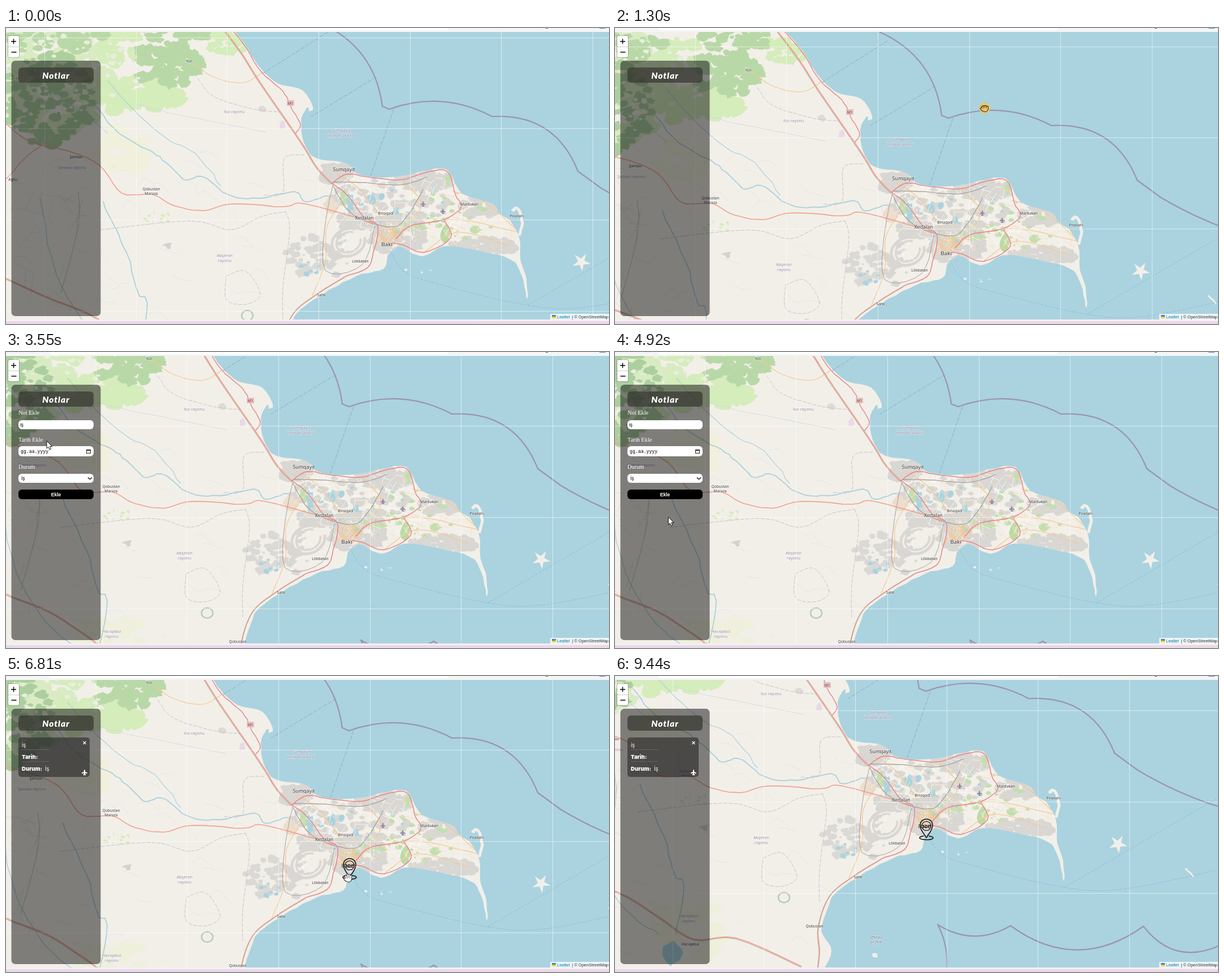
Recreate the animation shown at these times as an HTML page with a canvas. Size 1067 by 525 pixels, loop 9.51 s.

```html
<!DOCTYPE html>
<html lang="tr">
<head>
<meta charset="utf-8">
<title>Notlar</title>
<style>
html, body { margin: 0; width: 100%; height: 100%; overflow: hidden; background: #f6f6f6; }
canvas { display: block; width: 1067px; height: 525px; }
</style>
</head>
<body>
<canvas id="stage" width="1067" height="525"></canvas>
<script>
const LOOP = 9510, W = 1067, H = 525, TOP = 12, MAP_W = 1200, MAP_H = 660;
const ctx = document.getElementById('stage').getContext('2d');
const SANS = '"Noto Sans", sans-serif', ARIAL = '"Liberation Sans", Arial, sans-serif';

let seed = 7;
const rnd = () => (seed = (seed * 16807) % 2147483647) / 2147483647;
const spread = r => (rnd() - .5) * 2 * r;

// Smooth path through "x,y x,y ..." with a seeded wiggle between the key points.
function curve(str, wiggle = 0, closed = false) {
  const pts = str.trim().split(/\s+/).map(s => s.split(',').map(Number));
  const path = new Path2D(), last = pts.length - 1, steps = 5;
  path.moveTo(...pts[0]);
  for (let i = 0; i < last; i++) {
    const a = pts[Math.max(0, i - 1)], b = pts[i], c = pts[i + 1], d = pts[Math.min(last, i + 2)];
    for (let s = 1; s <= steps; s++) {
      const u = s / steps, w = s < steps ? wiggle : 0;
      const mix = k => b[k] + .5 * u * (c[k] - a[k] + u * (2 * a[k] - 5 * b[k] + 4 * c[k] - d[k]
        + u * (3 * (b[k] - c[k]) + d[k] - a[k])));
      path.lineTo(mix(0) + spread(w), mix(1) + spread(w));
    }
  }
  if (closed) path.closePath();
  return path;
}

function text(c, str, x, y, font, color, align = 'left') {
  c.font = font; c.fillStyle = color; c.textAlign = align;
  c.fillText(str, x, y);
}

function box(c, x, y, w, h, r, color) {
  c.fillStyle = color;
  c.beginPath(); c.roundRect(x, y, w, h, r); c.fill();
}

function seg(c, x1, y1, x2, y2) {
  c.beginPath(); c.moveTo(x1, y1); c.lineTo(x2, y2); c.stroke();
}

function plane(c, x, y, r, color) {
  c.save(); c.translate(x, y);
  c.strokeStyle = color; c.lineWidth = r * .42; c.lineCap = 'round';
  seg(c, 0, -r * .8, 0, r * .8);
  for (const side of [-1, 1]) {
    seg(c, 0, -r * .1, side * r * .8, r * .25);
    seg(c, 0, r * .7, side * r * .3, r * .85);
  }
  c.restore();
}

function buildMap() {
  const cv = document.createElement('canvas');
  cv.width = MAP_W; cv.height = MAP_H;
  const m = cv.getContext('2d');
  m.translate(0, TOP);
  m.lineJoin = m.lineCap = 'round';
  const line = (str, color, w = 1, wiggle = .6, dash = []) => {
    m.strokeStyle = color; m.lineWidth = w; m.setLineDash(dash);
    m.stroke(curve(str, wiggle)); m.setLineDash([]);
  };
  const blob = (x, y, rx, ry, color) => {
    m.fillStyle = color; m.beginPath();
    for (let a = 0; a < 6.2; a += .6) {
      const r = .65 + rnd() * .5;
      m.lineTo(x + rx * r * Math.cos(a), y + ry * r * Math.sin(a));
    }
    m.fill();
  };
  const scatter = (n, cx, cy, rx, ry, size, color) => {
    for (let i = 0; i < n; i++) {
      const a = rnd() * 6.3, r = Math.sqrt(rnd()), s = size * (.3 + rnd());
      blob(cx + rx * r * Math.cos(a), cy + ry * r * Math.sin(a), s * 1.4, s, color);
    }
  };
  const strokes = (n, cx, cy, rx, ry, len, color, w) => {
    m.strokeStyle = color; m.lineWidth = w;
    for (let i = 0; i < n; i++) {
      const x = cx + spread(rx), y = cy + spread(ry), a = .5 + (i % 2) * 1.57 + spread(.5), d = len * (.4 + rnd());
      seg(m, x, y, x + d * Math.cos(a), y + d * Math.sin(a));
    }
  };

  m.fillStyle = '#aad3df'; m.fillRect(0, -TOP, MAP_W, MAP_H);
  const land = curve(`388,-12 418,22 445,65 480,98 524,110 543,140 537,148 533,141 522,165 530,210 552,232 600,240
    628,261 690,264 740,254 780,251 806,293 858,311 874,330 893,343 908,372 910,408 921,445 922,480 913,440 893,411
    830,393 775,387 735,405 698,388 676,402 668,427 620,440 562,471 520,500 507,522 493,569 511,605 490,650`, .9);
  land.lineTo(-50, 650); land.lineTo(-50, -12); land.closePath();
  m.save(); m.clip(land);
  m.fillStyle = '#f2efe9'; m.fillRect(-50, -TOP, MAP_W, MAP_H);

  // woods and meadows
  const meadow = '#d5ecbb', wood = '#b9d8a7';
  scatter(110, 75, 80, 105, 105, 16, '#d9ebc3');
  scatter(60, 235, 118, 75, 30, 13, meadow);
  scatter(30, 205, 30, 45, 40, 11, meadow);
  scatter(30, 385, 25, 45, 20, 8, meadow);
  scatter(70, 285, 62, 62, 38, 10, wood);
  scatter(35, 290, 5, 75, 22, 9, wood);
  scatter(160, 75, 125, 80, 85, 8, '#adcf9f');
  scatter(45, 85, 20, 95, 26, 9, wood);
  scatter(70, 110, 85, 130, 85, 4, '#e8eedb');
  scatter(24, 205, 215, 40, 50, 14, '#f1f0dc');
  scatter(30, 265, 565, 95, 50, 14, '#eff0dc');
  scatter(14, 265, 335, 30, 10, 3, meadow);

  // towns and bare ground
  const town = '#d9d7d3';
  scatter(40, 583, 257, 26, 17, 8, town);
  scatter(75, 738, 272, 50, 17, 8, town);
  scatter(80, 690, 366, 50, 32, 8, town);
  scatter(45, 620, 340, 30, 16, 7, town);
  scatter(110, 680, 310, 105, 42, 6, town);
  scatter(40, 835, 318, 32, 18, 6, town);
  scatter(55, 842, 387, 58, 13, 7, town);
  scatter(30, 580, 400, 26, 45, 5, town);
  scatter(38, 530, 402, 34, 35, 7, '#dad9d6');
  scatter(10, 285, 385, 7, 5, 3, '#d2d3d1');
  scatter(10, 575, 317, 9, 8, 6, '#ecddcc');
  m.strokeStyle = '#d8d7d3';
  for (const r of [30, 22]) {
    m.lineWidth = r / 6;
    m.beginPath(); m.ellipse(606, 380, r, r * .8, -.4, .2, 5.4); m.stroke();
  }
  blob(489, 171, 6, 8, '#ead9e5');
  blob(454, 144, 8, 6, '#dddbd8');

  const green = '#c2dfae';
  blob(777, 366, 9, 18, '#b9dba5');
  blob(782, 270, 5, 14, green);
  blob(830, 358, 11, 9, green);
  blob(598, 300, 7, 17, green);
  scatter(40, 770, 335, 100, 45, 4, green);

  // lakes and rivers
  const water = '#aad3df', river = '#a9d0dc';
  blob(609, 310, 7, 20, water);
  blob(647, 304, 8, 12, water);
  blob(665, 299, 5, 8, water);
  blob(690, 325, 6, 8, water);
  blob(230, 608, 18, 26, water);
  scatter(16, 700, 320, 85, 45, 3, water);
  scatter(10, 537, 427, 18, 14, 3, water);
  line('160,140 200,187 250,215 285,240 318,270 345,263 395,296 450,302 510,290 530,308 569,298', river, 1.8, 1.6);
  line('180,94 235,155 290,200 335,222 380,280', river, 1.2, 1.4);
  line('172,308 214,400 234,470 250,488 236,575', river, 1.8, 2);
  line('60,300 90,440 145,530 205,575', river, 1.4, 1.8);
  line('0,70 90,120 180,187', river, 1, 1.5);
  line('230,135 310,155 460,185', '#c2dbe0', .8, 1.5);
  for (let i = 0; i < 45; i++) {
    const x = rnd() * 520, y = 200 + rnd() * 400;
    line(`${x},${y} ${x + 15},${y + spread(14)} ${x + 34},${y + 10}`, '#d9e0de', .6, 1.5);
  }

  // district borders
  const edge = '#c3bac4', dashes = [6, 3];
  line('340,90 365,120 430,142 485,150', edge, .9, 1, dashes);
  line('527,225 492,232 490,292 455,296', edge, .9, 0, dashes);
  line('168,358 326,342 398,358 452,334 495,326', edge, .9, 0, dashes);
  line('495,326 502,360 490,460 490,517', edge, .9, 0, dashes);
  line('390,440 424,431 450,472 425,490 390,482 390,440', edge, .9, 0, dashes);
  m.strokeStyle = '#b5ccb2'; m.lineWidth = 2.4;
  m.beginPath(); m.ellipse(427, 510, 10, 9, 0, 0, 7); m.stroke();

  // streets
  const amber = '#f6c78d';
  strokes(130, 705, 318, 110, 58, 20, '#fdfbf7', .8);
  strokes(50, 705, 318, 105, 55, 20, '#f5d9b4', .9);
  strokes(40, 676, 366, 18, 15, 12, amber, 1.1);
  strokes(30, 840, 355, 60, 30, 16, '#f7e0c2', .8);
  strokes(30, 75, 370, 70, 110, 34, '#d3d0cb', .6);
  line('330,62 370,88 420,97 452,80', amber, 1.2);
  line('600,300 568,352 565,415 542,475', amber, 1.2);
  line('585,258 630,290 672,350', amber, 1.3);
  line('700,270 735,312 700,360 678,374', amber, 1.3);
  line('790,290 840,304 895,350 910,368', amber, 1.2);
  line('720,350 800,340 905,362', amber, 1.2);
  line('742,396 800,362 890,386', amber, 1.2);

  // railways and main roads
  const rail = '#a5a09c', road = '#f2a08c', red = '#e98386';
  line('580,273 625,274 700,278 745,264', rail, 1.3);
  line('578,278 608,326 662,350 700,346 738,286', rail, 1.3);
  line('578,280 566,340 565,430 630,420 652,352', rail, 1);
  line('128,290 128,350 97,470', '#c0bcb8', 1);
  line('0,170 40,200 110,218 165,243 205,293 258,295 300,316 350,324 400,312 490,317 530,312 655,347', road, 1.6);
  line('75,202 40,225 0,268', road, 1.3);
  const pair = (str, w) => {
    line(str, road, w, 0);
    m.save(); m.translate(-1, 1.5); line(str, rail, .9, 0); m.restore();
  };
  pair('0,444 77,479 147,507 208,546 268,584 343,582 458,632', 1.8);
  pair('376,-10 415,42 450,97 522,202 550,247 577,276', 2);
  line('388,-10 420,28 452,78 490,112 505,142 521,172 513,186', red, 1.4);
  line('577,275 604,259 645,265 700,269 740,257 780,254 795,295 805,318 775,340 718,350 690,374', red, 1.5);
  line('775,340 787,372 740,398 700,384 680,382', red, 1.5);
  line('577,275 604,297 632,334 658,352 650,397 640,425 600,441', red, 1.5);
  pair('600,441 550,472 508,507 488,562 490,607 485,650', 1.8);
  m.restore();

  // islands
  const isle = '#f2efe9';
  line('897,323 906,321 914,345 909,366', isle, 5, 1);
  m.fillStyle = isle; m.beginPath();
  for (let i = 0; i < 10; i++) {
    const r = i % 2 ? 6 : 17, a = i * .628 - 2.3;
    m.lineTo(1018 + r * Math.cos(a), 415 + r * Math.sin(a));
  }
  m.fill();
  line('1138,459 1151,472', isle, 3);
  blob(588, 612, 5, 5, isle);
  scatter(5, 735, 431, 32, 4, 2, isle);

  // sea borders: chords bent outward by a share of their length
  const arc = (x1, y1, x2, y2, bend) => {
    const dx = x2 - x1, dy = y2 - y1;
    m.strokeStyle = '#9a94b2'; m.lineWidth = 2.2;
    m.beginPath(); m.moveTo(x1, y1);
    m.quadraticCurveTo(x1 + dx / 2 + dy * bend * 2, y1 + dy / 2 - dx * bend * 2, x2, y2);
    m.stroke();
  };
  arc(556, -9, 666, 139, .14);
  arc(666, 139, 678, 144, 0);
  arc(678, 144, 860, 157, .11);
  arc(860, 157, 1012, 254, .18);
  arc(1012, 254, 1053, 284, 0);
  arc(1053, 284, 1200, 350, -.03);
  arc(714, 645, 699, 558, -.08);
  arc(699, 558, 828, 560, -.15);
  arc(828, 560, 1063, 561, -.18);
  arc(1063, 561, 1200, 594, -.2);

  const thin = '#8f9cb8', ferry = '#8eb4d6';
  line('570,7 452,82', thin, .8, 0, [7, 3]);
  line('655,87 540,157', thin, .8, 0, [7, 3]);
  line('686,144 645,262', thin, .8, 0, [7, 3]);
  line('680,395 706,433 768,455 923,492 1028,495 1200,460', ferry, .8, 0, [4, 3]);
  line('923,492 1200,330', ferry, .8, 0, [4, 3]);

  // tile seams
  m.fillStyle = 'rgba(255,255,255,.55)';
  for (let x = 68.3; x < MAP_W; x += 161.7) m.fillRect(Math.floor(x), -TOP, 1, MAP_H);
  for (let y = 17; y < MAP_H; y += 161.7) m.fillRect(0, Math.floor(y), MAP_W, 1);

  const label = (str, x, y, size = 6.7, color = '#3a3a3a', style = '') => {
    m.strokeStyle = 'rgba(255,255,255,.5)'; m.lineWidth = 1.4;
    m.font = `${style} ${size}px ${SANS}`; m.textAlign = 'center';
    m.strokeText(str, x, y); m.fillStyle = color; m.fillText(str, x, y);
  };
  const area = (lines, x, y, size = 7.2, color = '#9b87a6', style = '') =>
    lines.split('/').forEach((s, i) => label(s, x, y + i * (size + 1.8), size, color, style));
  label('Sumqayıt', 598, 254, 8.8);
  label('Xırdalan', 634, 340, 8.6);
  label('Bakı', 674, 387, 9.8);
  label('Binəqədi', 672, 331);
  label('Mərdəkan', 820, 315);
  label('Pirallahı', 904, 336);
  label('Lökbatan', 627, 416);
  label('Sahil', 558, 476);
  label('Qobustan', 257, 288);
  label('Mərəzə', 257, 296);
  label('Xızı', 324, 61);
  label('Şamaxı', 124, 231);
  label('Ağsu', 12, 271);
  label('Qobustan', 481, 563);
  label('Hacıqabul', 261, 595);
  area('Xızı rayonu', 404, 151);
  area('Şamaxı rayonu', 117, 250);
  area('Abşeron/rayonu', 387, 406);
  area('Hacıqabul/rayonu', 258, 545);
  area('Sumqayıt/İnzibati ərazisi', 593, 184);
  area('offshore/oil field', 590, 583, 6.2, '#6e7892', 'italic');
  box(m, 497, 128, 13, 10, 1, '#e6bfc0');
  text(m, 'M1', 503.5, 135.6, `6.5px ${SANS}`, '#744247', 'center');
  plane(m, 738, 312, 4.5, '#8c82ad');
  plane(m, 773, 325, 4.5, '#8c82ad');
  return cv;
}

const ease = k => k * k * (3 - 2 * k);
const ramp = (t, a, b) => ease(Math.min(1, Math.max(0, (t - a) / (b - a))));
const between = (t, a, b) => t >= a && t < b;

// Pointer stops: time, x, y, held until the next stop. Held moves drag the map.
const HELD = true;
const STOPS = [
  [320, 805, 522], [720, 742, 126, HELD], [1280, 654, 142, HELD], [1400, 654, 142],
  [1790, 742, 394, HELD], [2550, 758.5, 330.5], [3000, 608, 357], [3140, 608, 357],
  [3330, 75, 128], [3550, 72, 158], [4030, 95, 222], [4570, 95, 300], [4720, 95, 300], [5580, 90, 250],
  [5860, 90, 250], [6310, 385, 292], [6840, 607.3, 359.3, HELD], [7320, 551, 290], [7560, 551, 290],
  [7760, 632, 245], [8150, 850, 230], [8590, 1035, 450],
];

function pointer(t) {
  const p = { x: 0, y: 0, panX: 0, panY: 0, held: false, shown: between(t, 320, 8590) };
  for (let i = 0; i < STOPS.length - 1 && t >= STOPS[i][0]; i++) {
    const [t0, x, y, held] = STOPS[i], [t1, x1, y1] = STOPS[i + 1], k = ramp(t, t0, t1);
    const dx = (x1 - x) * k, dy = (y1 - y) * k;
    p.x = x + dx; p.y = y + dy;
    p.held = !!held && t < t1;
    if (held) { p.panX += dx; p.panY += dy; }
  }
  return p;
}

function drawHand(lengths, color) {
  const fingers = (c, w) => {
    ctx.strokeStyle = ctx.fillStyle = c; ctx.lineWidth = w;
    lengths.forEach((len, i) => seg(ctx, i * 2.6 - 3, 2, (i - 1.4) * 3, 1 - len));
    seg(ctx, -3, 4, -6, 1);
    ctx.beginPath(); ctx.ellipse(1, 3, 3 + w / 2, 2 + w / 2, 0, 0, 7); ctx.fill();
  };
  fingers('#111', 4); fingers(color, 2.2);
}

function drawCursor(p, t) {
  if (!p.shown) return;
  ctx.save(); ctx.translate(p.x, p.y);
  ctx.lineJoin = ctx.lineCap = 'round';
  if (p.held) {
    const tint = t < 1500 ? '#eac36f' : '#e9dc62';
    ctx.fillStyle = tint; ctx.beginPath(); ctx.arc(0, 0, 10, 0, 7); ctx.fill();
    drawHand([3, 4, 4, 3], tint);
  } else if (p.x < 168 && p.y > 57) {
    ctx.beginPath();
    ctx.moveTo(0, 0); ctx.lineTo(0, 13); ctx.lineTo(3, 10.5); ctx.lineTo(5, 15);
    ctx.lineTo(7.5, 14); ctx.lineTo(5.5, 9.5); ctx.lineTo(9.5, 9.5); ctx.closePath();
    ctx.fillStyle = '#fff'; ctx.strokeStyle = '#111'; ctx.lineWidth = 1;
    ctx.fill(); ctx.stroke();
  } else drawHand(between(t, 7320, 7640) ? [7, 2, 2, 1] : [5, 7, 7, 5], '#fff');
  ctx.restore();
}

function drawPin(x, y) {
  ctx.save(); ctx.translate(x, y);
  ctx.strokeStyle = '#1c1c1c'; ctx.lineWidth = 1.7;
  ctx.beginPath(); ctx.ellipse(0, 0, 12, 3.4, 0, -1.2, 4.34); ctx.stroke();
  ctx.beginPath(); ctx.moveTo(0, 0);
  ctx.bezierCurveTo(-5, -9, -11, -14, -11, -22);
  ctx.bezierCurveTo(-11, -37, 11, -37, 11, -22);
  ctx.bezierCurveTo(11, -14, 5, -9, 0, 0); ctx.stroke();
  ctx.lineWidth = 1.2;
  ctx.beginPath(); ctx.arc(0, -21, 8.2, 0, 7); ctx.stroke();
  text(ctx, 'JOB', 0, -17.5, `bold 8.6px ${ARIAL}`, '#1c1c1c', 'center');
  ctx.restore();
}

function drawForm(t) {
  const small = `8.4px ${ARIAL}`;
  ['Not Ekle', 'Tarih Ekle', 'Durum'].forEach((s, i) =>
    text(ctx, s, 22, 111 + i * 48, '10.4px "Liberation Serif", serif', '#fff'));
  box(ctx, 22, 121, 133, 16, 6, '#fff');
  box(ctx, 22, 167, 133, 18, 6, '#fff');
  box(ctx, 22, 216, 133, 16, 6, '#fff');
  box(ctx, 22, 244, 133, 17, 6, '#000');
  const typed = Math.max(0, Math.floor((t - 3320) / 80));
  text(ctx, 'iş'.slice(0, typed), 25, 132, small, '#000');
  text(ctx, 'gg.aa.yyyy', 26, 179, '8.2px "Liberation Mono", monospace', '#000');
  text(ctx, 'İş', 27, 227, small, '#000');
  text(ctx, 'Ekle', 88.5, 256, `bold 8.6px ${ARIAL}`, '#fff', 'center');
  ctx.strokeStyle = ctx.fillStyle = '#222'; ctx.lineWidth = 1;
  ctx.strokeRect(142.5, 173.5, 7, 6);
  ctx.fillRect(142, 173, 8, 2);
  ctx.lineWidth = 1.6;
  seg(ctx, 145, 222.5, 148.5, 226); seg(ctx, 148.5, 226, 152, 222.5);
}

function drawCard(fade) {
  box(ctx, 22, 109, 126, 70, 5, `rgba(48,48,48,${.66 - .4 * fade})`);
  const thin = '9.6px Inter, sans-serif', thick = '900 9.6px Inter, sans-serif';
  text(ctx, 'iş', 28, 126, thin, '#fff');
  text(ctx, 'Tarih:', 28, 146.5, thick, '#fff');
  text(ctx, 'Durum:', 28, 168, thick, '#fff');
  text(ctx, 'İş', 69, 168, thin, '#fff');
  ctx.fillStyle = 'rgba(255,255,255,.15)';
  ctx.fillRect(28, 130, 48, 1); ctx.fillRect(28, 151, 48, 1);
  ctx.strokeStyle = '#fff'; ctx.lineWidth = 1.3;
  seg(ctx, 136.5, 116, 141.5, 121); seg(ctx, 141.5, 116, 136.5, 121);
  plane(ctx, 139, 171, 4.8, '#fff');
}

function drawPanel(t) {
  const fade = ramp(t, 5860, 6150) - ramp(t, 6380, 6720);
  box(ctx, 9.5, 58, 158, 453, 7, `rgba(12,12,12,${.5 + .13 * fade})`);
  box(ctx, 22, 70, 133, 27, 6, 'rgba(52,52,47,.68)');
  ctx.letterSpacing = '1px';
  text(ctx, 'Notlar', 88.5, 89.5, 'italic 900 15.5px Lato, sans-serif', '#fff', 'center');
  ctx.letterSpacing = '0px';
  if (between(t, 3140, 5840)) drawForm(t);
  if (t >= 5840) drawCard(fade);
}

function drawChrome(t) {
  ctx.fillStyle = '#f5f5f6'; ctx.fillRect(0, 0, W, 7);
  box(ctx, 74, -12, 712, 16, 8, '#fff');
  ctx.fillStyle = '#555'; ctx.fillRect(955, 0, 4, 1);
  ctx.fillStyle = '#3c94cb'; ctx.fillRect(1050, 0, 11, 1);
  ctx.fillStyle = '#f4f0f3'; ctx.fillRect(0, 517, W, 3);
  ctx.fillStyle = '#e9d8ea'; ctx.fillRect(0, 520, W, 5);
  const split = t < 320 || t >= 9440 ? 826 : 556;
  ctx.fillStyle = '#f1dcdc'; ctx.fillRect(split, 524, W - split, 1);

  box(ctx, 3, 13, 21, 40, 3, 'rgba(0,0,0,.22)');
  box(ctx, 4, 14, 19, 38, 2, '#fff');
  ctx.fillStyle = '#ccc'; ctx.fillRect(4, 33, 19, 1);
  ctx.fillStyle = '#111';
  ctx.fillRect(9, 23, 9, 1.6); ctx.fillRect(12.7, 19.3, 1.6, 9); ctx.fillRect(9.5, 42, 9, 1.6);

  ctx.fillStyle = 'rgba(255,255,255,.78)'; ctx.fillRect(963, 507, 104, 10);
  ctx.fillStyle = '#4c7be1'; ctx.fillRect(966, 509, 7, 3);
  ctx.fillStyle = '#ffd500'; ctx.fillRect(966, 512, 7, 3);
  const font = `7.5px ${ARIAL}`;
  text(ctx, 'Leaflet', 975, 515, font, '#0078a8');
  text(ctx, '| © OpenStreetMap', 1066, 515, font, '#333', 'right');
}

const map = buildMap();
function frame(now) {
  const t = now % LOOP, p = pointer(t);
  const px = Math.round(p.panX), py = Math.round(p.panY);
  ctx.drawImage(map, px, py - TOP);
  if (t >= 5900) drawPin(679 + px, 404 + py);
  drawPanel(t);
  drawChrome(t);
  drawCursor(p, t);
  requestAnimationFrame(frame);
}
requestAnimationFrame(frame);
</script>
</body>
</html>
```
